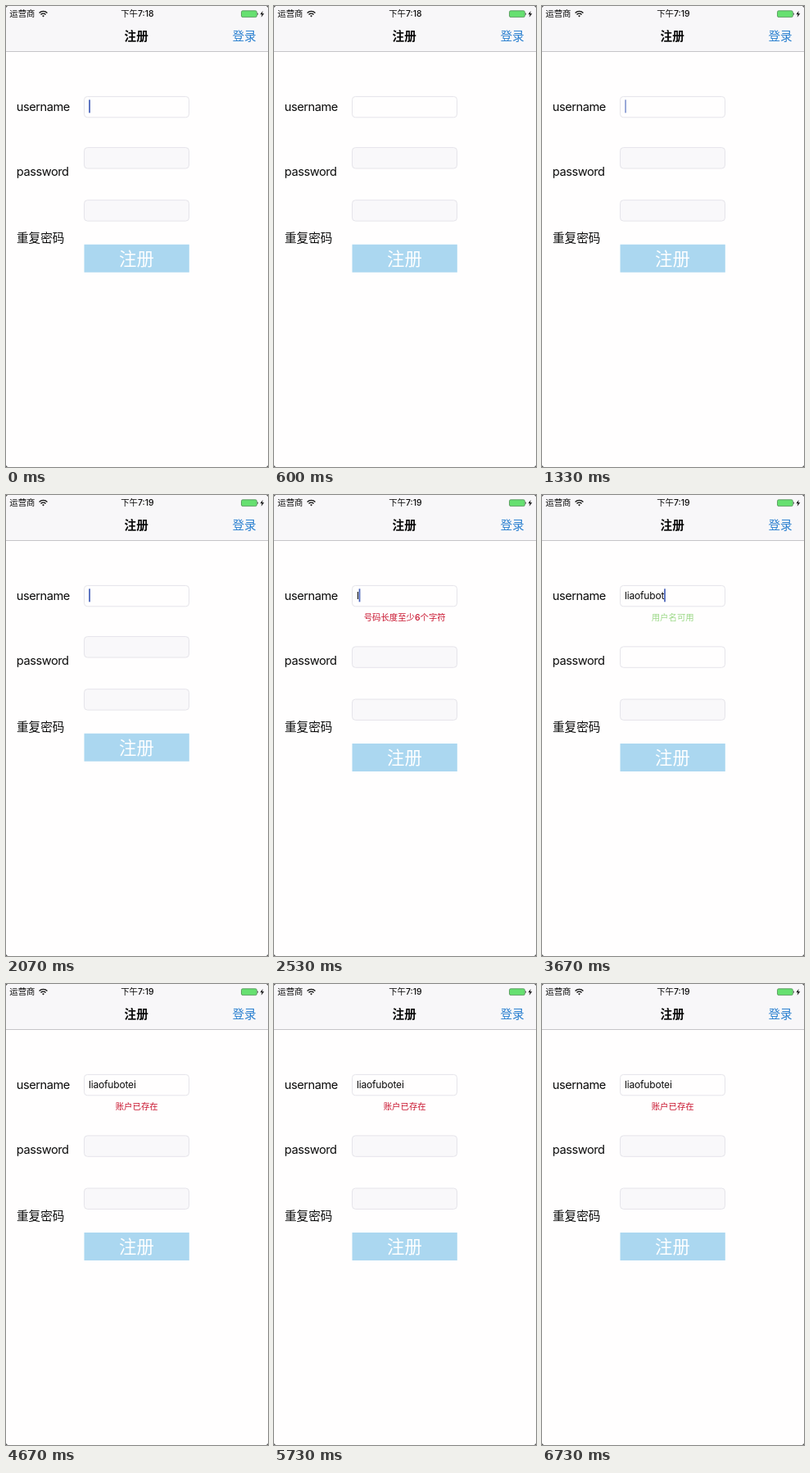
Recreate the animation shown at these times as an HTML page. Size 320 px wide and 562 px high, loop 6990 ms.

```html
<!DOCTYPE html>
<html lang="zh-CN">
<head>
<meta charset="utf-8">
<title>注册</title>
<style>
  html, body { margin: 0; width: 100%; height: 100%; overflow: hidden; background: #fffefe; }
  svg { display: block; width: 320px; height: 562px; }
  text { font-family: Inter, "Noto Sans CJK SC", "Noto Sans CJK", sans-serif; fill: #0a0a0a; }
  .label { font-size: 14.6px; }
  .latin { letter-spacing: -.45px; }
  .mid { text-anchor: middle; }
  .status { font-size: 10.4px; }
  .input { font-size: 12px; letter-spacing: -.17px; }
  .note { font-size: 10.4px; font-weight: 500; }
  .field { fill: #f9f8fa; stroke: #e5e4ea; }
  .on { fill: #fffefe; }
  .red { fill: #c9152f; }
  .green { fill: #9bd886; }
</style>
</head>
<body>
<svg viewBox="0 0 320 562">
  <rect width="320" height="562" fill="#fffefe"/>
  <rect width="320" height="55" fill="#f8f7f9"/>
  <rect y="55" width="320" height="1" fill="#c6c5c8"/>
  <path d="M0 0h2L0 2zM320 0v2l-2-2zM0 562v-2l2 2zM320 562h-2l2-2z" fill="#555"/>

  <text class="status" x="4.3" y="13.2">运营商</text>
  <g fill="none" stroke="#111" stroke-width="1.4">
    <path d="M40.6 8.4a7 7 0 0 1 9.8 0M42.5 10.5a4.3 4.3 0 0 1 6 0"/>
    <path d="M45.5 13.6l-1.4-1.6a2 2 0 0 1 2.8 0z" fill="#111" stroke="none"/>
  </g>
  <text id="clock" class="status mid" x="160.4" y="13.2" font-weight="500"></text>
  <rect x="287.5" y="5.8" width="18.8" height="7.8" rx="1.6" fill="#66e070" stroke="#4f8f55" stroke-width=".8"/>
  <path d="M307 8q1.8 1.7 0 3.4z" fill="#222"/>
  <path d="M313.6 6l-3.2 4.2h2.2l-.9 3.5 3.6-4.5h-2.3z" fill="#111"/>

  <text class="label mid" x="159.2" y="42.3" font-weight="700">注册</text>
  <text class="label" x="276.4" y="42.3" style="fill:#2b80d0">登录</text>

  <text class="label latin" x="12.8" y="128">username</text>
  <text class="label latin" x="12.8" y="207">password</text>
  <text class="label" x="13" y="288.4">重复密码</text>

  <rect class="field on" x="95.5" y="110.4" width="128" height="25.4" rx="4"/>
  <text id="entry" class="input" x="101" y="127"></text>
  <rect id="caret" y="114.3" width="1.7" height="16" fill="#4560b8"/>
  <text id="note" class="note mid" x="159.7" y="152.8"></text>

  <g id="form">
    <rect id="pass" class="field" x="95.5" y="172.6" width="128" height="25.4" rx="4"/>
    <rect class="field" x="95.5" y="236.7" width="128" height="25.4" rx="4"/>
    <rect x="95.5" y="290.7" width="128.3" height="34" fill="#abd7f0"/>
    <text class="mid" x="159.4" y="315.6" font-size="21.4" style="fill:#fff">注册</text>
  </g>
</svg>
<script>
  const LOOP = 6990;
  const NAME = "liaofubotei";
  const KEYS = [2530, 2670, 2800, 2930, 3070, 3200, 3330, 3470, 3600, 3800, 4000];
  const MINUTE = 1270, VALID = 3330, TAKEN = 4070;
  // Start and end of each caret fade; they alternate out, in, out...
  const FADES = [[200, 400], [730, 930], [1250, 1470], [1780, 1950], [4500, 4670],
                 [4980, 5180], [5530, 5730], [6050, 6250], [6530, 6720]];

  const $ = id => document.getElementById(id);
  const [clock, entry, caret, note, form, pass] =
    ["clock", "entry", "caret", "note", "form", "pass"].map($);

  function caretAlpha(t) {
    let alpha = 1;
    FADES.forEach(([a, b], i) => {
      const p = Math.min(1, Math.max(0, (t - a) / (b - a)));
      alpha += i % 2 ? p : -p;
    });
    return alpha;
  }

  function noteAt(t) {
    if (t < KEYS[0]) return ["", ""];
    if (t < VALID) return ["号码长度至少6个字符", "red"];
    if (t < TAKEN) return ["用户名可用", "green"];
    return ["账户已存在", "red"];
  }

  function setText(el, text) {
    if (el.textContent !== text) el.textContent = text;
  }

  function draw(t) {
    const count = KEYS.filter(k => t >= k).length;
    setText(clock, t < MINUTE ? "下午7:18" : "下午7:19");
    setText(entry, NAME.slice(0, count));
    caret.setAttribute("x", 101.2 + (count ? entry.getComputedTextLength() - .3 : 0));
    caret.setAttribute("opacity", caretAlpha(t));

    const [message, color] = noteAt(t);
    setText(note, message);
    note.setAttribute("class", "note mid " + color);
    form.setAttribute("transform", `translate(0 ${count ? 12.3 : 0})`);
    pass.setAttribute("class", t >= VALID && t < TAKEN ? "field on" : "field");
  }

  const start = performance.now();
  function tick() {
    draw((performance.now() - start) % LOOP);
    requestAnimationFrame(tick);
  }
  tick();
</script>
</body>
</html>
```
